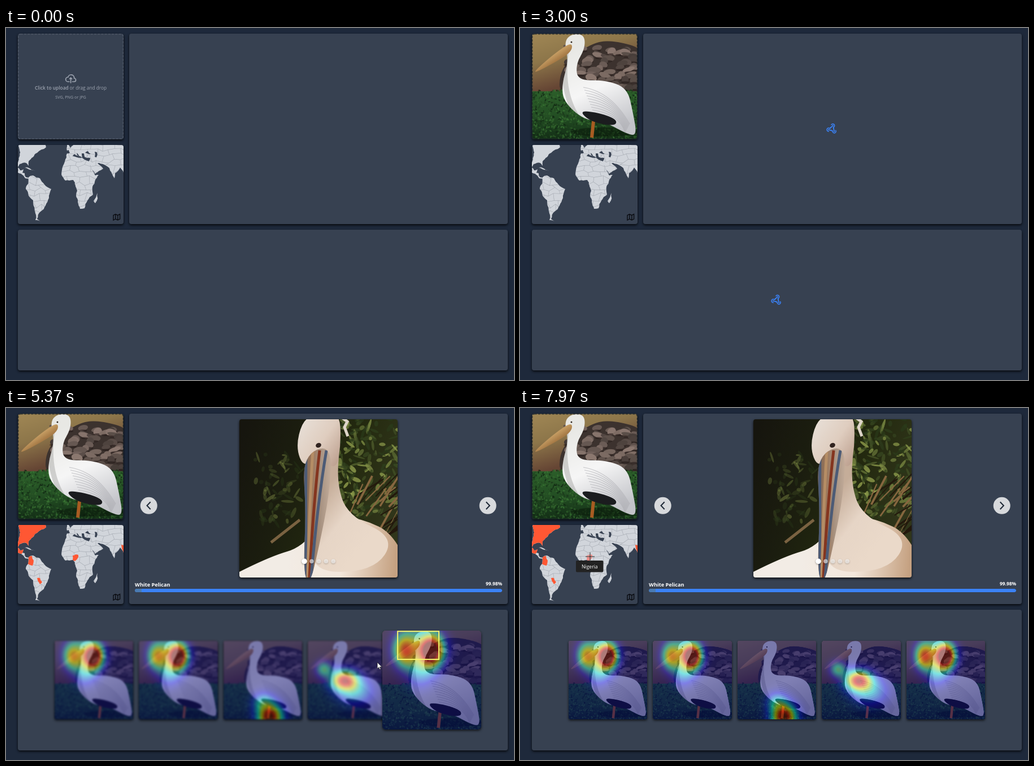
Animation, 899 px wide and 623 px high, one loop 8 s. Source, as an HTML page with a canvas:

```html
<!DOCTYPE html>
<html lang="en">
<head>
<meta charset="utf-8">
<title>Bird classifier</title>
<style>
html, body { margin: 0; width: 100%; height: 100%; overflow: hidden; background: #1e293b; }
canvas { display: block; }
</style>
</head>
<body>
<canvas id="stage" width="899" height="623"></canvas>
<script>
const LOOP = 8000, UPLOADED = 3000, RESULTS = 3610, BAR_START = 3625, TOOLTIP = 7820;
const PANEL = '#374151', LAND = '#d1d5db', ORANGE = '#ff5733', BLUE = '#3b82f6';
const ctx = document.getElementById('stage').getContext('2d');

const clamp = v => Math.max(0, Math.min(1, v));
const smooth = v => { v = clamp(v); return v * v * (3 - 2 * v); };
const mix = (a, b, k) => a + (b - a) * k;
const rgb = (r, g, b, a = 1) => `rgba(${r},${g},${b},${a})`;
const points = s => s.split(' ').map(p => p.split(',').map(Number));

function seeded(seed) {
  return () => (seed = (seed * 16807) % 2147483647) / 2147483647;
}

function layer(w, h, scale, paint) {
  const canvas = document.createElement('canvas');
  canvas.width = w * scale;
  canvas.height = h * scale;
  const c = canvas.getContext('2d');
  c.scale(scale, scale);
  paint(c);
  return canvas;
}

function fill(c, path, color) {
  c.fillStyle = color;
  c.fill(path);
}

function stroke(c, path, color, width) {
  c.strokeStyle = color;
  c.lineWidth = width;
  c.stroke(typeof path === 'string' ? new Path2D(path) : path);
}

function ellipse(c, x, y, rx, ry, angle, color) {
  c.fillStyle = color;
  c.beginPath();
  c.ellipse(x, y, rx, ry, angle, 0, 7);
  c.fill();
}

// Closed smooth curve guided by a few corner points
function curve(s) {
  const pts = points(s), path = new Path2D();
  pts.forEach(([x, y], i) => {
    const [nx, ny] = pts[(i + 1) % pts.length];
    const [px, py] = pts.at(i - 1);
    if (!i) path.moveTo((px + x) / 2, (py + y) / 2);
    path.quadraticCurveTo(x, y, (x + nx) / 2, (y + ny) / 2);
  });
  return path;
}

// Closed outline whose edges are broken up like a coastline
function coast(s) {
  const rnd = seeded(7), pts = points(s), path = new Path2D();
  const edge = ([ax, ay], [bx, by]) => {
    const dx = bx - ax, dy = by - ay;
    if (Math.hypot(dx, dy) < 5) return path.lineTo(bx, by);
    const k = (rnd() - .5) * .25;
    const mid = [(ax + bx) / 2 - dy * k, (ay + by) / 2 + dx * k];
    edge([ax, ay], mid);
    edge(mid, [bx, by]);
  };
  path.moveTo(...pts[0]);
  pts.forEach((p, i) => edge(p, pts[(i + 1) % pts.length]));
  return path;
}

function gradient(c, x0, y0, x1, y1, ...colors) {
  const g = c.createLinearGradient(x0, y0, x1, y1);
  colors.forEach((color, i) => g.addColorStop(i / (colors.length - 1), color));
  return g;
}

function roundRect(c, x, y, w, h, r) {
  c.beginPath();
  c.roundRect(x, y, w, h, r);
}

function shadow(c, color, blur, dy) {
  c.shadowColor = color;
  c.shadowBlur = blur;
  c.shadowOffsetY = dy;
}

function text(str, x, y, font, color, align = 'left') {
  ctx.font = font + ' "Open Sans", "Noto Sans", sans-serif';
  ctx.fillStyle = color;
  ctx.textAlign = align;
  ctx.fillText(str, x, y);
}

// Uploaded picture: pelican on grass in front of rocks
const scene = layer(187, 187, 2, c => {
  const rnd = seeded(11);
  c.translate(-21, -10);
  c.fillStyle = gradient(c, 21, 10, 50, 110, '#a08755', '#8d764a', '#654534');
  c.fillRect(21, 10, 187, 187);
  fill(c, curve('70,70 120,30 160,20 230,40 230,130 70,130'), '#3c322e');
  for (let i = 0; i < 70; i++) {
    const x = 84 + rnd() * 128, y = 34 + i * 1.1, v = 65 + rnd() * 75;
    ellipse(c, x, y, 6 + rnd() * 6, 3 + rnd() * 4, rnd() - .5, rgb(v, v * .86, v * .8));
    ellipse(c, x, y + 5, 7, 1.8, 0, 'rgba(35,25,24,.6)');
  }
  c.fillStyle = gradient(c, 0, 108, 0, 197, '#2c5f2a', '#245024', '#132e16');
  c.fillRect(21, 112, 187, 86);
  for (let i = 0; i < 1100; i++) {
    const v = rnd();
    ellipse(c, 21 + rnd() * 187, 110 + rnd() * 88, 2.2, 1.2, rnd() * 3, rgb(15 + v * 45, 35 + v * 85, 18 + v * 35, .8));
  }
  ellipse(c, 150, 184, 60, 8, 0, 'rgba(8,22,8,.5)');
  stroke(c, 'M130 165L127 194', '#a85c22', 6);
  const body = curve('92,10 114,12 115,36 99,64 102,93 150,92 190,106 200,150 207,190 190,188 150,166 112,162 77,130 74,100 86,58 78,24');
  fill(c, body, gradient(c, 80, 40, 150, 190, '#e8e8e4', '#f6f6f6', '#c2c3c8'));
  c.save();
  c.clip(body);
  stroke(c, 'M82 40Q70 120 110 170', 'rgba(120,120,115,.3)', 9);
  for (let i = 0; i < 9; i++) {
    stroke(c, `M${112 + i * 2} ${105 + i * 5}q50 8 ${82 - i * 3} ${65 - i * 3}`, 'rgba(165,165,172,.5)', 1.3);
  }
  c.restore();
  fill(c, curve('104,146 140,150 172,162 168,174 125,166'), '#1b1c1f');
  fill(c, curve('92,24 92,42 60,62 27,79 27,75 60,46'), gradient(c, 50, 50, 58, 62, '#cda56a', '#a77b47'));
  ellipse(c, 91, 25, 1.4, 1.4, 0, '#2a2018');
});

// Reference picture: close-up of a pelican
const portrait = layer(280, 280, 1, c => {
  const rnd = seeded(42);
  c.translate(-413, -20);
  c.fillStyle = gradient(c, 413, 60, 692, 150, '#16150e', '#1b1d0f', '#23290f', '#30351a');
  c.fillRect(413, 20, 280, 280);
  for (let i = 0; i < 260; i++) {
    const near = i % 4, v = rnd() ** 2;
    const x = near ? 580 + rnd() * 115 : 440 + rnd() * 85;
    const y = near ? 20 + rnd() * 170 : 80 + rnd() * 125;
    ellipse(c, x, y, 3 + rnd() * 9, 1.5 + rnd() * 2.5, rnd() * 3, rgb(40 + v * 120, 55 + v * 120, 25 + v * 60, near ? .7 : .35));
  }
  for (let i = 0; i < 24; i++) {
    const x = 605 + rnd() * 75, y = 150 + rnd() * 85;
    stroke(c, `M${x} ${y}l${24 + rnd() * 40} ${-25 - rnd() * 35}`, i % 2 ? '#86663f' : '#23180c', 1 + rnd() * 3);
  }
  stroke(c, 'M469 238L520 198', '#7a6241', 5);
  fill(c, curve('380,306 470,262 525,246 565,190 630,195 690,225 730,330 380,330'), gradient(c, 500, 250, 690, 270, '#f2ece5', '#f3e7db', '#c5a181'));
  fill(c, curve('556,60 592,56 585,130 604,190 690,230 650,290 530,290 562,180'), gradient(c, 560, 150, 650, 220, '#c5ad99', '#e6d5c6', '#ead9c9'));
  stroke(c, 'M590 14L604 24 599 34 605 50', '#ded4c8', 5);
  fill(c, curve('545,12 590,6 593,60 585,112 552,84 527,106 513,70 524,24'), gradient(c, 520, 40, 590, 90, '#e6dcd3', '#dfcdbf', '#bfa392'));
  const bill = curve('524,86 576,62 573,150 553,250 538,312 526,292 531,180');
  fill(c, bill, gradient(c, 524, 0, 574, 0, '#6f625a', '#997457', '#a89382', '#c0aa98'));
  c.save();
  c.clip(bill);
  ['#4c5b76', '#b58d65', '#84351f', '#4c5b76'].forEach((color, i) =>
    stroke(c, `M${531 + i * 12} 75Q${530 + i * 7} 170 ${531 + i * 3} 300`, color, 5));
  c.restore();
  ellipse(c, 553, 66, 5, 4, -.4, '#30231f');
});

// Heat spots: x, y, rx, ry, strength, as fractions of the picture
const headSpots = left => [[.5, .2, .12, .16, 1], [.22, .2, .11, .16, left], [.36, .15, .2, .2, .35], [.38, .4, .14, .16, .25]];
const thumbs = [
  headSpots(.5),
  headSpots(.5),
  [[.59, .97, .15, .16, 1], [.5, .78, .13, .12, .3]],
  [[.46, .5, .17, .13, .85], [.2, .36, .1, .1, .4], [.6, .64, .22, .17, .3]],
  headSpots(.65)
].map((spots, i) => ({ x: 155.5 + 149.5 * i, image: thumbImage(spots), box: hotBox(spots) }));

function heatmap(spots, size) {
  return layer(size, size, 1, c => {
    const img = c.createImageData(size, size);
    const channel = (v, mid) => 215 * clamp(1.5 - Math.abs(4 * v - mid));
    for (let i = 0; i < size * size; i++) {
      const x = (i % size) / size, y = Math.floor(i / size) / size;
      const v = Math.min(1, spots.reduce((sum, [sx, sy, rx, ry, amp]) =>
        sum + amp * Math.exp(-(((x - sx) / rx) ** 2) - ((y - sy) / ry) ** 2), 0));
      img.data.set([channel(v, 3), channel(v, 2), channel(v, 1), 122], i * 4);
    }
    c.putImageData(img, 0, 0);
  });
}

function thumbImage(spots) {
  return layer(140, 140, 2, c => {
    roundRect(c, 0, 0, 140, 140, 4);
    c.clip();
    c.drawImage(scene, 0, 0, 140, 140);
    c.drawImage(heatmap(spots, 280), 0, 0, 140, 140);
  });
}

function hotBox(spots) {
  const hot = spots.filter(spot => spot[4] >= .5);
  const [left, top, right, bottom] = [[0, -1], [1, -1], [0, 1], [1, 1]].map(([axis, side]) =>
    clamp(side * Math.max(...hot.map(s => side * s[axis] + s[axis + 2] * .6))));
  return [left, top < .12 ? 0 : top, right - left, bottom - (top < .12 ? 0 : top)];
}

// World map
const northAmerica = ['21,205 70,205 71,211 55,221 40,236 40,244 36,239 24,241 21,246', '21,247 25,252 31,250 28,258 21,256'].map(coast);
const otherLand = [
  '26,257 33,257 35,264 42,266 34,266',
  '33,247 41,248 52,253 43,251',
  '40,264 48,261 60,266 68,277 80,285 76,301 61,325 55,338 62,343 52,340 48,305 35,285',
  '107,229 123,228 147,236 158,261 164,260 153,281 154,295 139,319 131,320 124,296 126,288 119,269 105,270 98,260',
  '162,292 158,310 155,306',
  '107,229 108,222 113,221 111,216 122,205 210,205 208,256 202,247 193,257 192,266 183,248 162,239 172,249 157,258 147,240 149,230 139,228 138,222 134,222 135,230 125,221 131,230 121,223 114,229',
  '108,207 111,207 114,216 108,217'
].map(coast);
const seas = ['140,221 145,218 150,223', '157,219 161,220 160,229 157,228'].map(coast);
const nigeria = coast('118,261 128,260 128,264 122,271 118,269');
const habitat = [...northAmerica, nigeria, ...['40,264 46,262 49,270 47,279 39,276', '55,301 60,301 64,308 60,312', '204,242 208,243 208,256'].map(coast)];

// Countries: a jittered brick pattern seen only on land
const worldMap = layer(187, 140, 2, c => {
  const rnd = seeded(5), step = 10, grid = [];
  c.translate(-21, -207);
  [...northAmerica, ...otherLand].forEach(path => fill(c, path, LAND));
  const clip = new Path2D();
  otherLand.forEach(path => clip.addPath(path));
  c.save();
  c.clip(clip);
  for (let row = 0; row < 16; row++) {
    grid.push(Array.from({ length: 20 }, (_, col) =>
      [21 + (col + (rnd() - .5) * .8) * step, 205 + (row + (rnd() - .5) * .8) * step]));
  }
  const lines = new Path2D();
  grid.forEach((cells, row) => cells.forEach(([x, y], col) => {
    for (const next of [cells[col + 1], (row + col) % 2 && grid[row + 1]?.[col]]) {
      if (!next) continue;
      lines.moveTo(x, y);
      lines.lineTo(...next);
    }
  }));
  stroke(c, lines, '#a2a7af', .6);
  c.restore();
  seas.forEach(path => fill(c, path, PANEL));
});

function drawMap(t) {
  ctx.save();
  roundRect(ctx, 21, 207, 187, 140, 4);
  ctx.clip();
  ctx.drawImage(worldMap, 21, 207, 187, 140);
  if (t >= RESULTS) {
    habitat.forEach(path => fill(ctx, path, path === nigeria && t > TOOLTIP ? '#ee8b87' : ORANGE));
  }
  ctx.restore();
  stroke(ctx, 'M190 331.4l3.8-1.9 4 1.9 3.8-1.9V338l-3.8 2-4-2-3.8 2zm3.8-1.9V338m4-6.6V340', '#0b0d12', 1.4);
  if (t > TOOLTIP) {
    roundRect(ctx, 99, 270, 48.5, 20.5, 2);
    ctx.fillStyle = '#222';
    ctx.fill();
    text('Nigeria', 123.3, 283.8, '400 8.6px', '#fff', 'center');
  }
}

function panel(x, y, w, h, color = PANEL) {
  ctx.save();
  shadow(ctx, 'rgba(0,0,0,.8)', 4, 2);
  roundRect(ctx, x, y, w, h, 4);
  ctx.fillStyle = color;
  ctx.fill();
  ctx.restore();
}

function drawUpload(t) {
  const over = smooth((t - 440) / 130);
  panel(21, 10, 187, 187, rgb(mix(55, 31, over), mix(65, 41, over), mix(81, 55, over)));
  let border = rgb(mix(82, 124, over), mix(91, 131, over), mix(106, 142, over));
  if (t >= UPLOADED) {
    ctx.save();
    roundRect(ctx, 21.5, 10.5, 186, 186, 4);
    ctx.clip();
    ctx.drawImage(scene, 21, 10, 187, 187);
    ctx.restore();
    border = 'rgba(28,35,38,.8)';
  } else {
    ctx.save();
    ctx.translate(104.6, 82);
    ctx.lineCap = ctx.lineJoin = 'round';
    stroke(ctx, 'M13 13h3a3 3 0 0 0 0-6A5.5 5.5 0 0 0 5.2 5 4 4 0 0 0 5 13h2.2M10 15V6m-2 2 2-2 2 2', '#9ca3af', 1.7);
    ctx.restore();
    text('Click to upload', 51, 108.7, '600 8.4px', '#9ca3af');
    text('or drag and drop', 112.6, 108.7, '400 8.3px', '#9ca3af');
    text('SVG, PNG or JPG', 114.5, 124.6, '400 7.2px', '#9ca3af', 'center');
  }
  ctx.save();
  ctx.setLineDash([4, 2.2]);
  roundRect(ctx, 21.8, 10.8, 185.6, 185.4, 4);
  ctx.strokeStyle = border;
  ctx.lineWidth = 1.3;
  ctx.stroke();
  ctx.restore();
}

function drawSpinner(x, y, t) {
  ctx.save();
  ctx.translate(x, y);
  ctx.rotate(.28 + (t - UPLOADED) / 1000 * Math.PI * 2);
  for (let i = 0; i < 3; i++) {
    ctx.rotate(Math.PI * 2 / 3);
    stroke(ctx, 'M-3-6a3 3 0 1 1 4.6 2.5L3.9.6M0-6L-3.3-.3', BLUE, 1.6);
    ellipse(ctx, 0, -6, 1.2, 1.2, 0, BLUE);
  }
  ctx.restore();
}

// cubic-bezier(.4, 0, .2, 1)
function standardEase(x) {
  let lo = 0, hi = 1;
  for (let i = 0; i < 20; i++) {
    const s = (lo + hi) / 2;
    if (1.2 * s * (1 - s) ** 2 + .6 * s * s * (1 - s) + s ** 3 < x) lo = s; else hi = s;
  }
  return 3 * lo * lo - 2 * lo ** 3;
}

function drawArrow(x, dir) {
  ellipse(ctx, x, 172.8, 15, 15, 0, '#d7d9dc');
  stroke(ctx, `M${x - dir * 3} 166.3l${dir * 6.2} 6.5 ${-dir * 6.2} 6.5`, '#1f2937', 2);
}

function drawCarousel(t) {
  panel(413, 20, 280, 280);
  ctx.save();
  roundRect(ctx, 413, 20, 280, 280, 4);
  ctx.clip();
  ctx.drawImage(portrait, 413, 20);
  shadow(ctx, 'rgba(0,0,0,.4)', 3, 1);
  for (let i = 0; i < 5; i++) {
    const r = i ? 3.8 : 4.8;
    ellipse(ctx, 528 + i * 12.8, 271.3, r, r, 0, i ? 'rgba(255,255,255,.6)' : '#fff');
  }
  ctx.restore();
  drawArrow(252.7, -1);
  drawArrow(852.7, 1);
  text('White Pelican', 228, 316.4, '700 9.2px', '#fff');
  text('99.98%', 878, 314.3, '700 8.4px', '#fff', 'right');

  ctx.save();
  roundRect(ctx, 228, 320, 650, 6, 3);
  ctx.clip();
  ctx.fillStyle = gradient(ctx, 0, 320, 0, 326, '#262d39', '#4b5563', '#4b5563');
  ctx.fillRect(228, 320, 650, 6);
  roundRect(ctx, 228, 320, 650 * standardEase(clamp((t - BAR_START) / 1000)), 6, 3);
  ctx.clip();
  ctx.fillStyle = BLUE;
  ctx.fillRect(228, 320, 650, 6);
  ctx.fillStyle = '#4a7bb3';
  ctx.fillRect(228, 320, 12, 6);
  ctx.restore();
}

// Pointer moves along quadratic curves and rests in between
const linear = k => k, easeIn = k => k * k, easeOut = k => 1 - (1 - k) ** 4;
const moves = [
  { start: 120, end: 780, path: '775,541 459,420 143,139', ease: easeOut },
  { start: 980, end: 1060, path: '143,139 147,143 150,147', ease: linear },
  { start: 1460, end: 1720, path: '150,147 300,118 531,112', ease: linear },
  { start: 4750, end: 5100, path: '878,297 800,430 770,452', ease: linear },
  { start: 5100, end: 6200, path: '770,452 540,446 310,460', ease: linear },
  { start: 6470, end: 6750, path: '310,460 255,464 200,458', ease: easeOut },
  { start: 6750, end: 7230, path: '200,458 190,390 199,335', ease: easeIn },
  { start: 7230, end: 7970, path: '199,335 130,240 124,263', ease: linear }
];

function pointerAt(t) {
  const move = moves.findLast(m => m.start <= t);
  if (!move || (t >= 1790 && t < 4750)) return null;
  const k = move.ease(clamp((t - move.start) / (move.end - move.start)));
  const [a, b, c] = points(move.path);
  return [0, 1].map(i => mix(mix(a[i], b[i], k), mix(b[i], c[i], k), k));
}

function hoveredThumb(t) {
  const at = t >= RESULTS && pointerAt(t);
  return at && at[1] > 405 && at[1] < 555 ? Math.round((at[0] - 131.5) / 149.5) : -1;
}

function drawThumbs(t) {
  const recent = Array.from({ length: 13 }, (_, i) => hoveredThumb(t - i * 10));
  const share = test => smooth(recent.filter(test).length / recent.length);
  const focus = share(index => index >= 0);
  thumbs
    .map((thumb, i) => ({ ...thumb, grow: share(index => index === i) }))
    .sort((a, b) => a.grow - b.grow)
    .forEach(({ x: center, image, box, grow }) => {
      const size = 139.5 + 35 * grow, x = center - size / 2, y = 481.5 - size / 2;
      const blur = 1.8 * focus * (1 - grow);
      ctx.save();
      if (blur > .05) ctx.filter = `blur(${blur}px)`;
      shadow(ctx, 'rgba(0,0,0,.7)', 4, 2);
      ctx.drawImage(image, x, y, size, size);
      ctx.restore();
      const [bx, by, bw, bh] = box.map(v => v * size);
      ctx.strokeStyle = rgb(246, 244, 108, grow);
      ctx.lineWidth = 2;
      ctx.strokeRect(x + bx, y + by + 1, bw, bh - 2);
    });
}

function drawPointer(t) {
  const at = pointerAt(t);
  if (!at) return;
  const [x, y] = at;
  ctx.save();
  ctx.translate(x, y);
  if (x < 208 && y > 207 && y < 347) {
    stroke(ctx, 'M-8 0H8M0-7.5V7.5', 'rgba(255,255,255,.5)', 2);
    stroke(ctx, 'M-8 0H8M0-7.5V7.5', '#111', 1);
  } else {
    const shape = new Path2D(x < 208 && y < 197 && t < 1060
      ? 'M2 1q1-1.5 2 0v4l5 1q1 1 1 2l-1 5H4L0 9q0-2 2-1z'
      : 'M0 0v11l2.6-2.3 1.8 4.1 1.7-.7-1.7-4H8z');
    fill(ctx, shape, '#fff');
    stroke(ctx, shape, '#111', .7);
    if (t >= 1200 && t < 1260) stroke(ctx, 'M6 0a4 4 0 1 0 8 0a4 4 0 1 0-8 0', '#4f9be0', 1.5);
  }
  ctx.restore();
}

function draw(t) {
  ctx.fillStyle = '#1e293b';
  ctx.fillRect(0, 0, 899, 623);
  panel(218, 10, 670, 337);
  panel(21, 207, 187, 140);
  panel(21, 357, 867, 249);
  drawUpload(t);
  drawMap(t);
  if (t >= RESULTS) {
    drawCarousel(t);
    drawThumbs(t);
  } else if (t >= UPLOADED) {
    drawSpinner(552, 178.5, t);
    drawSpinner(454, 481.5, t);
  }
  drawPointer(t);
}

let start;
function tick(now) {
  start ??= now;
  draw((now - start) % LOOP);
  requestAnimationFrame(tick);
}
requestAnimationFrame(tick);
</script>
</body>
</html>
```
